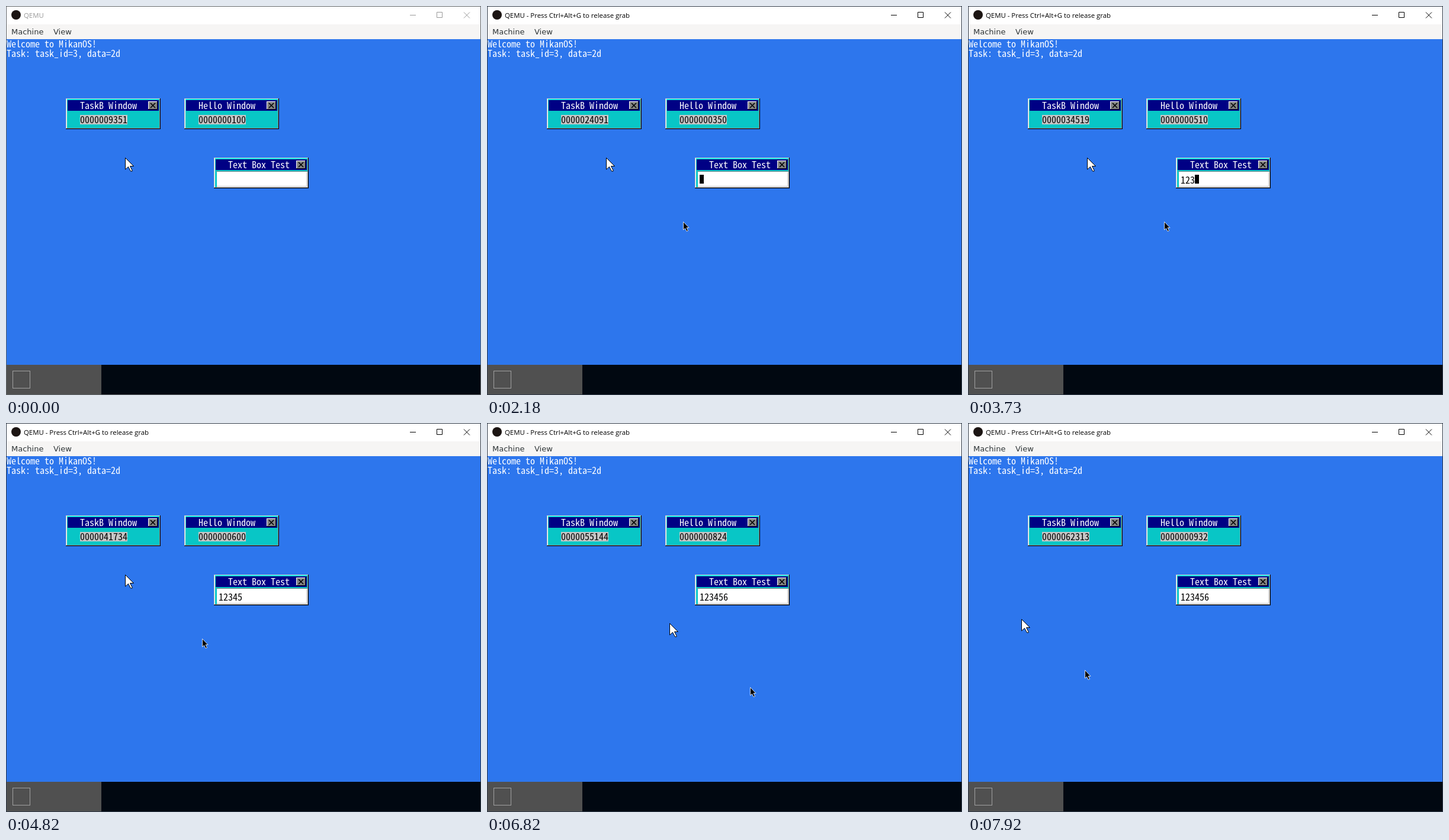
Write an HTML page that moves like this. It is 802 by 657 pixels and loops after 8 s.

```html
<!DOCTYPE html>
<html lang="en">
<head>
<meta charset="utf-8">
<title>QEMU</title>
<style>
html, body { margin: 0; width: 100%; height: 100%; overflow: hidden; background: #fff; }
svg { display: block; width: 802px; height: 657px; }
rect, .crisp { shape-rendering: crispEdges; }
.cell { font: 300 16px "Noto Sans Mono CJK JP", "Noto Sans Mono CJK SC", "Noto Sans Mono", monospace; white-space: pre; }
.title { font: 11.4px "Open Sans", "Noto Sans", sans-serif; }
.menu { font: 13px "DejaVu Sans", sans-serif; fill: #2e3436; }
</style>
</head>
<body>
<svg id="stage" viewBox="0 0 802 657" xmlns="http://www.w3.org/2000/svg"></svg>
<script>
const LOOP = 8000;
const CYAN = '#08c6c6', SILVER = '#c6c6c6', GRAY = '#848484', NAVY = '#000084';
const stage = document.getElementById('stage');

function add(tag, attrs, text) {
  const el = document.createElementNS(stage.namespaceURI, tag);
  for (const name in attrs) el.setAttribute(name, attrs[name]);
  if (text) el.textContent = text;
  stage.appendChild(el);
  return el;
}
const box = (x, y, width, height, fill) => add('rect', { x, y, width, height, fill });
const line = (d, stroke, width = 1) =>
  add('path', { d, stroke, fill: 'none', 'stroke-width': width });

// Console glyphs sit on an 8 pixel cell grid.
const cells = (x, n) => Array.from({ length: n }, (_, i) => x + 8 * i).join(' ');
const print = (x, y, text, fill, size = text.length) =>
  add('text', { class: 'cell', x: cells(x, size), y, fill }, text);

function frameWindow(x, y, title) {
  const w = 160, h = 52;
  box(x, y, w, h, CYAN);
  box(x, y, w, 1, SILVER);
  box(x, y, 1, h, SILVER);
  box(x + 1, y + 1, w - 2, 1, '#00ffff');
  box(x + 1, y + 1, 1, h - 2, '#fff');
  box(x + w - 2, y + 1, 1, h - 2, GRAY);
  box(x + 1, y + h - 2, w - 2, 1, GRAY);
  box(x + w - 1, y, 1, h, '#000');
  box(x, y + h - 1, w, 1, '#000');
  box(x + 3, y + 3, w - 6, 18, NAVY);
  print(x + 24, y + 18, title, '#fff');

  const bx = x + w - 21, by = y + 5;
  box(bx, by, 16, 14, '#000');
  box(bx, by, 15, 13, '#fff');
  box(bx + 1, by + 1, 14, 12, GRAY);
  line(`M${bx + 4} ${by + 3}l8 8m0-8l-8 8`, '#000', 1.6);
}

function counter(x, y) {
  box(x, y, 80, 16, SILVER);
  return print(x, y + 14, '0000000000', '#000');
}

// Host window
box(0, 0, 802, 657, '#fff');
add('circle', { cx: 17, cy: 15, r: 8, fill: '#1c1513' });
const caption = add('text', { class: 'title', x: 30, y: 20 });
const buttons = line('M682 15.5h10M727.5 10.5h9v9h-9zM773 10.5l10 10m0-10l-10 10', '#000');
box(1, 31, 800, 25, '#f6f5f4');
add('text', { class: 'menu', x: 9, y: 48 }, 'Machine');
add('text', { class: 'menu', x: 80, y: 48 }, 'View');

// Guest desktop
box(1, 56, 800, 550, '#2d76ed');
box(1, 606, 800, 50, '#010811');
box(1, 606, 160, 50, '#505050');
add('rect', { x: 11.5, y: 616.5, width: 29, height: 29, fill: 'none', stroke: '#a0a0a0' });
print(1, 70, 'Welcome to MikanOS!', '#fff');
print(1, 86, 'Task: task_id=3, data=2d', '#fff');

frameWindow(101, 156, 'TaskB Window');
const taskCount = counter(125, 184);
frameWindow(301, 156, 'Hello Window');
const helloCount = counter(325, 184);

frameWindow(351, 256, 'Text Box Test');
box(356, 280, 153, 26, '#fff');
box(355, 279, 153, 1, GRAY);
box(507, 281, 1, 24, SILVER);
box(356, 304, 152, 1, SILVER);
const typed = print(359, 300, '', '#000', 6);
const caret = box(359, 285, 7, 15, '#000');

const guest = add('path', {
  d: 'M.5.5V20l5-4.5 4 7.5h2.5V21.500l-3.500-7h6z', fill: '#fff', stroke: '#000'
});
const host = add('path', {
  d: 'M.5.5v13.500l3-2.500 2.500 5 2.500-1-2.500-5h4z', fill: '#000', stroke: '#fff', 'stroke-width': .8
});
const border = add('rect', { x: .5, y: .5, width: 801, height: 656, fill: 'none' });

// Timeline
const STARTS = [70, 930, 1780, 2640, 3500, 4350, 5200, 6060, 6900, 7750, 8600];
const COUNTS = [[0, 9351], [17, 18465], [28, 24091], [48, 34519], [76, 48949], [88, 55144], [103, 62826]];
const KEYS = [2700, 3180, 3680, 4130, 4550, 5030];
const FOCUS = 1550, ENTER = 430, ROAM = 6450;
const ENTRY = [[ENTER, 756, 640], [700, 520, 480], [1000, 345, 375], [1120, 331, 364]];
const HOST = [[ROAM, 331, 364], [6820, 443, 445], [7150, 559, 488], [7400, 500, 514],
  [7680, 385, 507], [7790, 302, 488], [7920, 197, 417], [8050, 110, 360]];
const GUEST = [[ROAM, 201, 256], [6820, 307, 337], [7150, 424, 381], [7400, 372, 412],
  [7680, 268, 411], [7790, 190, 396], [7920, 90, 331], [8050, 10, 280]];

function step(t) {
  if (t < STARTS[0]) return { index: 0, time: 0 };
  let g = 0;
  while (t >= STARTS[g + 1]) g++;
  const span = (STARTS[g + 1] - STARTS[g]) / 11;
  const j = Math.min(10, Math.floor((t - STARTS[g] + 5) / span));
  return { index: 1 + g * 11 + j, time: STARTS[g] + j * span };
}

function ramp(points, at) {
  let i = 0;
  while (i < points.length - 2 && at >= points[i + 1][0]) i++;
  const [a, b] = [points[i], points[i + 1]];
  return a[1] + (b[1] - a[1]) * (at - a[0]) / (b[0] - a[0]);
}

// Smooth Hermite path through [time, x, y] points.
function along(path, t) {
  const last = path.length - 1;
  if (t <= path[0][0]) return path[0].slice(1);
  if (t >= path[last][0]) return path[last].slice(1);
  let i = 0;
  while (t >= path[i + 1][0]) i++;
  const [a, b] = [path[i], path[i + 1]], d = b[0] - a[0], u = (t - a[0]) / d;
  const slope = (k, c) => k === 0 || k === last ? 0 :
    (path[k + 1][c] - path[k - 1][c]) / (path[k + 1][0] - path[k - 1][0]);
  return [1, 2].map(c => {
    const m = slope(i, c) * d, n = slope(i + 1, c) * d, v = 1 - u;
    return Math.round(a[c] * v * v * (1 + 2 * u) + m * u * v * v
      + b[c] * u * u * (3 - 2 * u) - n * u * u * v);
  });
}

const place = (el, [x, y]) => el.setAttribute('transform', `translate(${x} ${y})`);
const show = (el, on) => el.setAttribute('visibility', on ? 'visible' : 'hidden');
const pad = n => String(Math.floor(n)).padStart(10, '0');
const ticks = t => Math.floor(142 + t / 10 + 1e-6);

function render(t) {
  const { index, time } = step(t);
  const now = ticks(time);
  const blink = Math.floor(now / 50) * 50;
  const pressed = KEYS.filter(k => k <= time);
  const lastKey = pressed.length ? ticks(pressed[pressed.length - 1]) : 0;

  taskCount.textContent = pad(ramp(COUNTS, index) + 1e-6);
  // This counter is only redrawn on timer, key and mouse events.
  helloCount.textContent = pad(time > ROAM ? now : Math.max(blink, lastKey));
  typed.textContent = '123456'.slice(0, pressed.length);
  caret.setAttribute('x', 359 + 8 * pressed.length);
  show(caret, blink / 50 % 2 === 1 || lastKey > blink);

  const focused = time >= FOCUS;
  caption.textContent = focused ? 'QEMU - Press Ctrl+Alt+G to release grab' : 'QEMU';
  caption.setAttribute('fill', focused ? '#000' : '#999');
  buttons.setAttribute('stroke', focused ? '#000' : '#999');
  border.setAttribute('stroke', focused ? '#303a48' : '#606468');

  show(host, time >= ENTER);
  place(host, time < ROAM ? along(ENTRY, time) : along(HOST, t < 7920 ? time : 7920));
  place(guest, along(GUEST, t < 7920 ? time : 7920));
}

function loop() {
  render(performance.now() % LOOP);
  requestAnimationFrame(loop);
}
loop();
</script>
</body>
</html>
```
